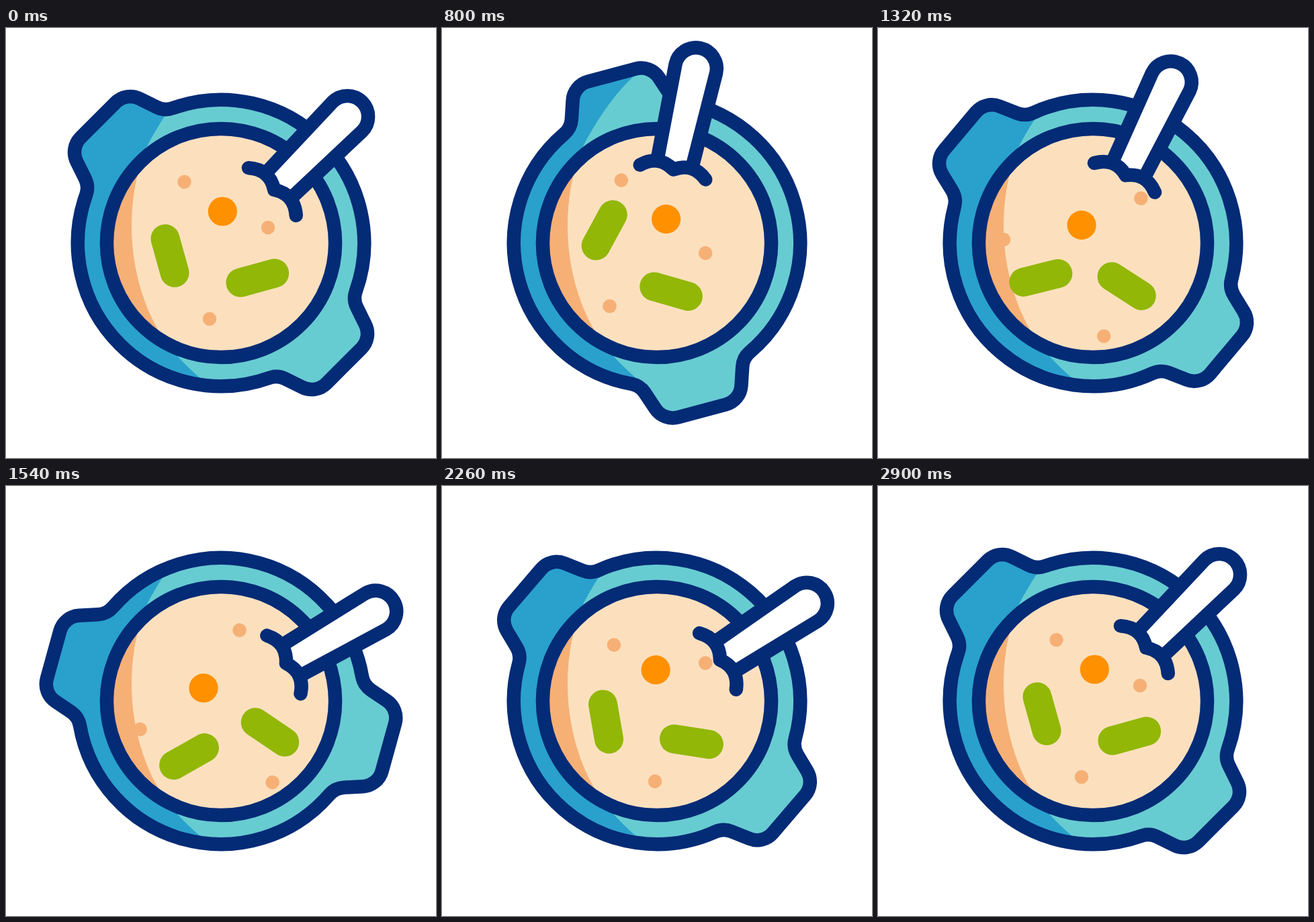
Animation of 640x640 px, one loop 3600 ms. Source, as an HTML page:

```html
<!DOCTYPE html>
<html lang="en">
<head>
<meta charset="utf-8">
<title>Stirring soup</title>
<style>
  html, body { margin: 0; width: 100%; height: 100%; overflow: hidden; background: #fff; }
  svg { display: block; width: 100%; height: 100%; }
  .line { fill: none; stroke: #042b76; stroke-width: 20.5; stroke-linecap: round; stroke-linejoin: round; }
  .pea { stroke: #92b706; stroke-width: 43; stroke-linecap: round; }
  .crumb { fill: #f6b076; }
</style>
</head>
<body>
<svg viewBox="-320 -320 640 640">
  <defs>
    <path id="pot" d="M-200.8-71.6A31 31 0 0 0-202.2-95.8L-214.8-121.2A31 31 0 0 1-208.9-156.9L-156.9-208.9A31 31 0 0 1-121.2-214.8L-95.8-202.2A31 31 0 0 0-71.6-200.8A213.2 213.2 0 0 1 200.8 71.6A31 31 0 0 0 202.2 95.8L214.8 121.2A31 31 0 0 1 208.9 156.9L156.9 208.9A31 31 0 0 1 121.2 214.8L95.8 202.2A31 31 0 0 0 71.6 200.8A213.2 213.2 0 0 1-200.8-71.6Z"/>
    <path id="shade" d="M-20-260C-58-232-88-185-108-148C-124-114-133-72-133-25C-133 32-118 88-92 132C-76 157-56 180-30 202L-10 220H-320V-320Z"/>
    <clipPath id="potClip"><use href="#pot" class="turn"/></clipPath>
    <clipPath id="bowlClip"><circle r="170"/></clipPath>
  </defs>

  <use href="#pot" class="turn" fill="#67ccd1"/>
  <g clip-path="url(#potClip)"><use href="#shade" fill="#29a1cc"/></g>
  <g class="turn"><use href="#pot" class="line"/></g>

  <circle r="170" fill="#fce0be"/>
  <g clip-path="url(#bowlClip)"><use href="#shade" fill="#f6b076"/></g>

  <g class="turn">
    <circle id="crumbA" class="crumb" r="10.3"/>
    <circle id="crumbB" class="crumb" r="10.3"/>
    <circle id="crumbC" class="crumb" r="10.3"/>
    <circle id="carrot" r="21.6" fill="#ff9100"/>
    <path id="peaA" class="pea" d="M-26.3 0H26.3"/>
    <path id="peaB" class="pea" d="M-26.3 0H26.3"/>
  </g>
  <circle r="170.1" class="line"/>

  <g id="spoon">
    <path class="line" style="fill:#fff" d="M-26.5-120L-31-266A31 31 0 0 1 31-266L26.5-120"/>
    <path class="line" d="M-50-108Q-26-129 0-112Q26-129 50-108"/>
  </g>
</svg>
<script>
  const LOOP = 3600;

  // Each step: time, value, and optional easing handles for the way into it.
  const tracks = {
    pot: [[0, 0], [575, 30], [1010, 30], [1570, -30], [1620, -30], [2465, 0]],
    spoon: [[160, 0], [1060, -40.6], [1080, -40.6], [1745, 31], [1780, 31], [2900, 0, .45, .23]],
    early: [[330, 0], [1280, 1], [1360, 1], [2380, 0]],
    middle: [[600, 0], [1520, 1], [2560, 0]],
    late: [[790, 0], [1720, 1], [2740, 0]],
    peaA: [[600, 74.5], [1480, 180], [1630, 180], [2410, 74.5]],
    peaB: [[720, -15.4], [1840, 80.5], [2500, -15.4]]
  };

  // Resting place, pushed-aside place, sideways bend, timing, optional spin.
  const food = [
    { id: 'crumbA', home: [-54.5, -91], away: [-132, -16.5], move: 'early' },
    { id: 'carrot', home: [2.3, -47], away: [-14.6, -28], move: 'early' },
    { id: 'crumbC', home: [-17, 113], away: [7, 143.2], move: 'middle' },
    { id: 'peaA', home: [-76, 19], away: [-82, 48.5], bend: -1.5, move: 'middle', spin: 'peaA' },
    { id: 'crumbB', home: [70, -23], away: [75, -84], bend: 4, move: 'late' },
    { id: 'peaB', home: [54.3, 52], away: [39.5, 79], bend: -1, move: 'late', spin: 'peaB' }
  ];

  const $ = id => document.getElementById(id);
  const turning = document.querySelectorAll('.turn');
  const mix = (a, b, p) => a + (b - a) * p;

  // Cubic curve with flat ends; x1 and x2 are the horizontal handles.
  function ease(x, x1 = 1 / 3, x2 = 2 / 3) {
    let lo = 0, hi = 1;
    for (let i = 0; i < 24; i++) {
      const s = (lo + hi) / 2, r = 1 - s;
      if (3 * x1 * s * r * r + 3 * x2 * s * s * r + s * s * s < x) lo = s; else hi = s;
    }
    return lo * lo * (3 - 2 * lo);
  }

  function at(name, t) {
    const steps = tracks[name];
    if (t <= steps[0][0]) return steps[0][1];
    for (let i = 1; i < steps.length; i++) {
      const [t0, v0] = steps[i - 1], [t1, v1, x1, x2] = steps[i];
      if (t < t1) return mix(v0, v1, ease((t - t0) / (t1 - t0), x1, x2));
    }
    return steps[steps.length - 1][1];
  }

  function draw(t) {
    const turn = `rotate(${at('pot', t)})`;
    turning.forEach(el => el.setAttribute('transform', turn));
    $('spoon').setAttribute('transform', `rotate(${45 + at('spoon', t)})`);
    for (const { id, home, away, bend = 0, move, spin } of food) {
      const p = at(move, t);
      const x = mix(home[0], away[0], p) + bend * 4 * p * (1 - p);
      const y = mix(home[1], away[1], p);
      const angle = spin ? at(spin, t) : 0;
      $(id).setAttribute('transform', `translate(${x} ${y}) rotate(${angle})`);
    }
  }

  const start = performance.now();
  function tick() {
    draw((performance.now() - start) % LOOP);
    requestAnimationFrame(tick);
  }
  tick();
</script>
</body>
</html>
```
